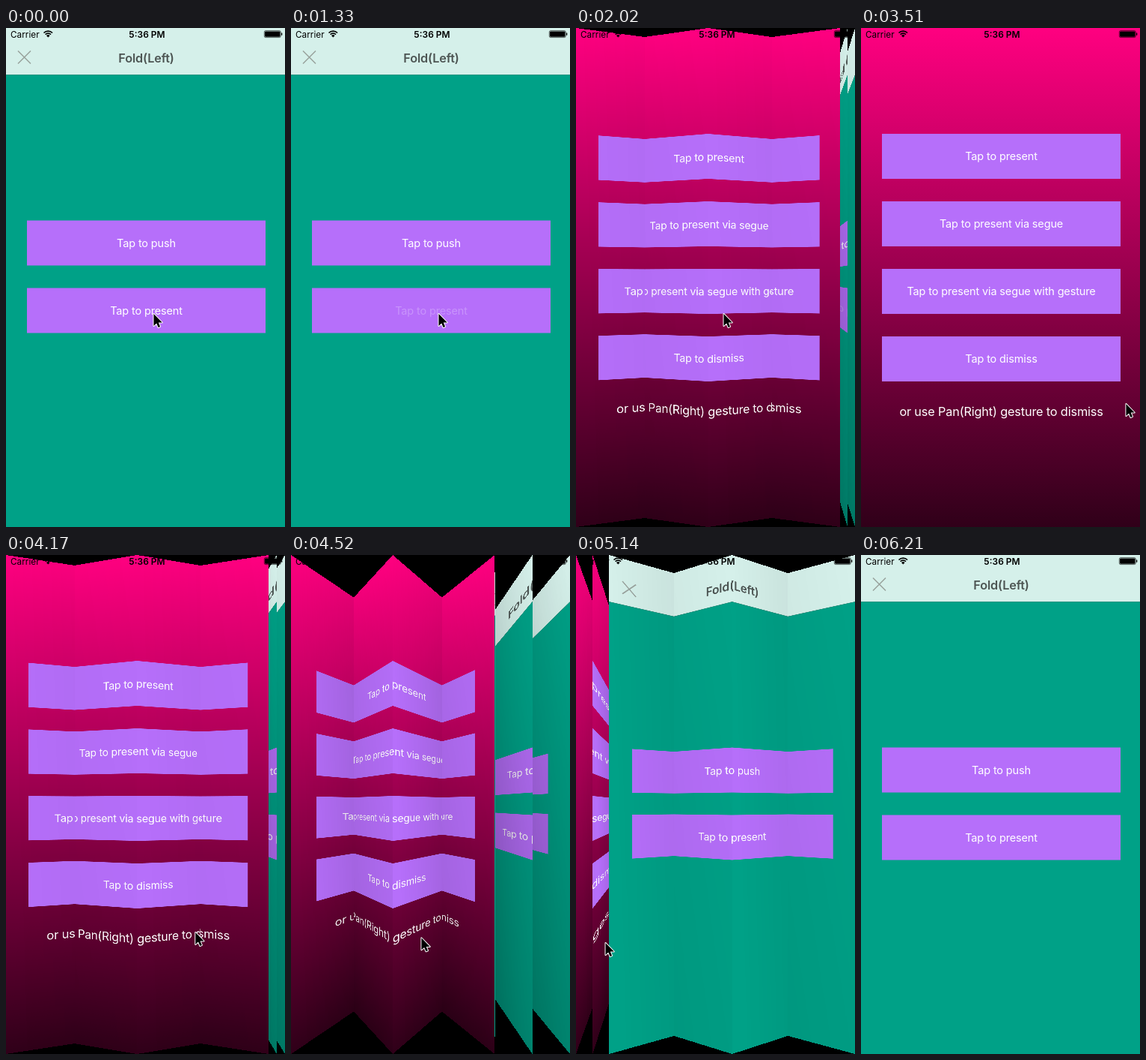
An HTML page with a canvas for the animation above (7.59 s loop, 373 by 665 pixels).

```html
<!DOCTYPE html>
<html lang="en">
<head>
<meta charset="utf-8">
<title>Fold transition</title>
<style>
  html, body { margin: 0; width: 100%; height: 100%; overflow: hidden; background: #000; }
  canvas { display: block; width: 373px; height: 665px; }
</style>
</head>
<body>
<canvas id="stage" width="373" height="665"></canvas>
<script>
const W = 373, H = 665, LOOP = 7590;
const FOLDS = 2, PANEL = W / FOLDS / 2;
const PERSPECTIVE = 0.00503;
const TEX = 2;
const FONT = 'Inter, Roboto, "Liberation Sans", sans-serif';
const ctx = document.getElementById('stage').getContext('2d');

// rows: [time, value, ...]
const cursorPath = [
  [0, 197, 381], [2620, 197, 381], [2720, 222, 401], [2860, 300, 462],
  [2970, 348, 496], [3030, 357, 501], [3450, 357, 501], [3510, 354, 501],
  [3760, 332, 501], [4000, 289, 502], [4170, 253, 503], [4310, 224, 506],
  [4500, 179, 510], [4760, 116, 514], [5020, 58, 517], [5140, 39, 517],
  [5810, 39, 517], [5950, 92, 548], [6090, 205, 620], [6210, 285, 680]
];
const panPath = [
  [3510, 0], [3760, 0.005], [4000, 0.025], [4170, 0.059], [4260, 0.09],
  [4500, 0.25], [4760, 0.5], [5020, 0.78], [5200, 0.93], [5370, 1]
];

function track(rows, t) {
  if (t <= rows[0][0]) return rows[0].slice(1);
  for (let i = 1; i < rows.length; i++) {
    const a = rows[i - 1], b = rows[i];
    if (t < b[0]) {
      const f = (t - a[0]) / (b[0] - a[0]);
      return a.slice(1).map((v, j) => v + (b[j + 1] - v) * f);
    }
  }
  return rows[rows.length - 1].slice(1);
}

// cubic-bezier(.42, 0, .58, 1)
function easeInOut(x) {
  if (x <= 0) return 0;
  if (x >= 1) return 1;
  let lo = 0, hi = 1;
  for (let i = 0; i < 24; i++) {
    const s = (lo + hi) / 2, r = 1 - s;
    if (3 * r * r * s * 0.42 + 3 * r * s * s * 0.58 + s * s * s < x) lo = s; else hi = s;
  }
  return lo * lo * (3 - 2 * lo);
}

function text(c, str, x, y, size, color, weight = 400, align = 'center', spacing = '-0.01em') {
  c.font = `${weight} ${size}px ${FONT}`;
  c.letterSpacing = spacing;
  c.textAlign = align;
  c.fillStyle = color;
  c.fillText(str, x, y);
}

function button(c, label, y, ink = '#fff') {
  c.fillStyle = '#b66ffa';
  c.fillRect(28, y, 319, 60);
  text(c, label, 187.5, y + 35.3, 14.5, ink);
}

function paintGreen(c, pressed) {
  c.fillStyle = '#00a187';
  c.fillRect(0, 0, W, H);
  c.fillStyle = '#d5f0ea';
  c.fillRect(0, 0, W, 62);
  c.fillStyle = '#3f8f80';
  c.fillRect(0, 62, W, 0.6);
  c.strokeStyle = '#98a19c';
  c.lineWidth = 1.5;
  c.beginPath();
  c.moveTo(16, 30.5); c.lineTo(33, 47.5);
  c.moveTo(33, 30.5); c.lineTo(16, 47.5);
  c.stroke();
  text(c, 'Fold(Left)', 187.5, 46, 16.3, '#4d5553', 600);
  button(c, 'Tap to push', 256.5);
  button(c, 'Tap to present', 346.5, pressed ? 'rgba(255,255,255,.25)' : '#fff');
}

function paintPink(c) {
  const g = c.createLinearGradient(0, 0, 0, H);
  g.addColorStop(0, '#ff0080');
  g.addColorStop(1, '#300019');
  c.fillStyle = g;
  c.fillRect(0, 0, W, H);
  ['Tap to present', 'Tap to present via segue',
   'Tap to present via segue with gesture', 'Tap to dismiss']
    .forEach((label, i) => button(c, label, 141 + 90 * i));
  text(c, 'or use Pan(Right) gesture to dismiss', 187.5, 517.3, 16.3, '#fff');
}

function bake(w, h, sx, sy, paint) {
  const cv = document.createElement('canvas');
  cv.width = w;
  cv.height = h;
  const c = cv.getContext('2d');
  c.scale(sx, sy);
  paint(c);
  return cv;
}

const screen = paint => bake(W * TEX, H * TEX, TEX, TEX, paint);
const shadow = (x0, y0, x1, y1) => bake(94, H, 94, H, c => {
  const g = c.createLinearGradient(x0, y0, x1, y1);
  g.addColorStop(0, 'rgba(0,0,0,0)');
  g.addColorStop(1, 'rgba(0,0,0,.5)');
  c.fillStyle = g;
  c.fillRect(0, 0, 1, 1);
});

const green = screen(c => paintGreen(c, false));
const greenPressed = screen(c => paintGreen(c, true));
const pink = screen(paintPink);
const leftShadow = shadow(0, 0.2, 1, 0);
const rightShadow = shadow(1, 0, 0, 1);

// Hinged panels of one view squeezed between lo and hi; closed is 0 (flat) to 1 (edge on)
function panels(tex, lo, hi, closed, leaving) {
  const angle = closed * Math.PI / 2, span = (hi - lo) / FOLDS, list = [];
  for (let i = 0; i < FOLDS * 2; i++) {
    const left = i % 2 === 0;
    list.push({
      tex, closed, left,
      dir: left ? 1 : -1,
      hinge: lo + Math.ceil(i / 2) * span,
      texHinge: Math.ceil(i / 2) * PANEL * 2,
      cos: Math.cos(angle), sin: Math.sin(angle),
      lens: leaving ? PERSPECTIVE * closed : 0
    });
  }
  return list;
}

// Where the sight line through screen column x meets a panel
function hit(p, x) {
  const r = (x - p.hinge) / (p.dir * p.cos - PERSPECTIVE * (x - W / 2) * p.sin);
  const near = 1 - p.lens * p.sin * r;
  if (!(r >= 0) || near <= 0) return null;
  const u = r / near, depth = p.sin * r;
  return u > PANEL + 0.01 ? null : { p, u, depth, scale: near / (1 + PERSPECTIVE * depth) };
}

function drawColumn(list, x) {
  let best = null;
  for (const p of list) {
    const h = hit(p, x + 0.5);
    if (h && (!best || h.depth < best.depth)) best = h;
  }
  if (!best) return;
  const { p, u, scale } = best;
  const next = hit(p, x + 1);
  const step = next ? Math.abs(next.u - u) * 2 : 1;
  const sw = Math.min(6, Math.max(1, step * TEX));
  const sx = Math.min(W * TEX - sw, Math.max(0, (p.texHinge + p.dir * u) * TEX - sw / 2));
  const h = H * scale, y = (H - h) / 2;
  ctx.drawImage(p.tex, sx, 0, sw, H * TEX, x, y, 1, h);
  const su = (p.left ? u : PANEL - u) / PANEL * 93;
  ctx.globalAlpha = p.closed;
  ctx.drawImage(p.left ? leftShadow : rightShadow, Math.min(93, Math.max(0, su)), 0, 1, H, x, y, 1, h);
  ctx.globalAlpha = 1;
}

function drawFold(open, greenTex, pinkLeaves) {
  ctx.fillStyle = '#000';
  ctx.fillRect(0, 0, W, H);
  const edge = W * open;
  const list = [
    ...panels(pink, 0, edge, 1 - open, pinkLeaves),
    ...panels(greenTex, edge, W, open, !pinkLeaves)
  ];
  for (let x = 0; x < W; x++) drawColumn(list, x);
}

function drawStatus() {
  text(ctx, 'Carrier', 6, 12.5, 11.8, '#000', 400, 'left', '0px');
  text(ctx, '5:36 PM', 188.5, 12.5, 12, '#000', 600, 'center', '0px');
  ctx.strokeStyle = ctx.fillStyle = '#000';
  ctx.lineWidth = 1.6;
  for (const r of [8.2, 5.2]) {
    ctx.beginPath();
    ctx.arc(56.3, 12.3, r, -Math.PI * 0.75, -Math.PI * 0.25);
    ctx.stroke();
  }
  ctx.beginPath();
  ctx.moveTo(56.3, 12.5);
  ctx.arc(56.3, 12.5, 3.2, -Math.PI * 0.75, -Math.PI * 0.25);
  ctx.fill();
  ctx.lineWidth = 0.6;
  ctx.beginPath();
  ctx.roundRect(345.3, 3.6, 22, 9, 1.8);
  ctx.stroke();
  ctx.beginPath();
  ctx.roundRect(346.1, 4.4, 20.4, 7.4, 1);
  ctx.fill();
  ctx.fillRect(368.1, 6.5, 1.2, 3.2);
}

const arrow = new Path2D('M0 0V16L3.7 12.6 6.1 18 8.6 16.9 6.3 11.6H11.3Z');

function drawCursor(x, y) {
  ctx.save();
  ctx.translate(x + 0.5, y);
  ctx.lineJoin = 'round';
  ctx.lineWidth = 2;
  ctx.strokeStyle = '#fff';
  ctx.stroke(arrow);
  ctx.fillStyle = '#000';
  ctx.fill(arrow);
  ctx.restore();
}

function draw(t) {
  if (t < 1330 || t >= 5370) paintGreen(ctx, false);
  else if (t < 1420) paintGreen(ctx, true);
  else if (t < 2140) drawFold(easeInOut((t - 1420) / 718), greenPressed, false);
  else if (t <= 3520) paintPink(ctx);
  else drawFold(1 - track(panPath, t)[0], green, true);
  drawStatus();
  if (t < 6210) drawCursor(...track(cursorPath, t));
}

const start = performance.now();
function frame() {
  draw((performance.now() - start) % LOOP);
  requestAnimationFrame(frame);
}
frame();
</script>
</body>
</html>
```
